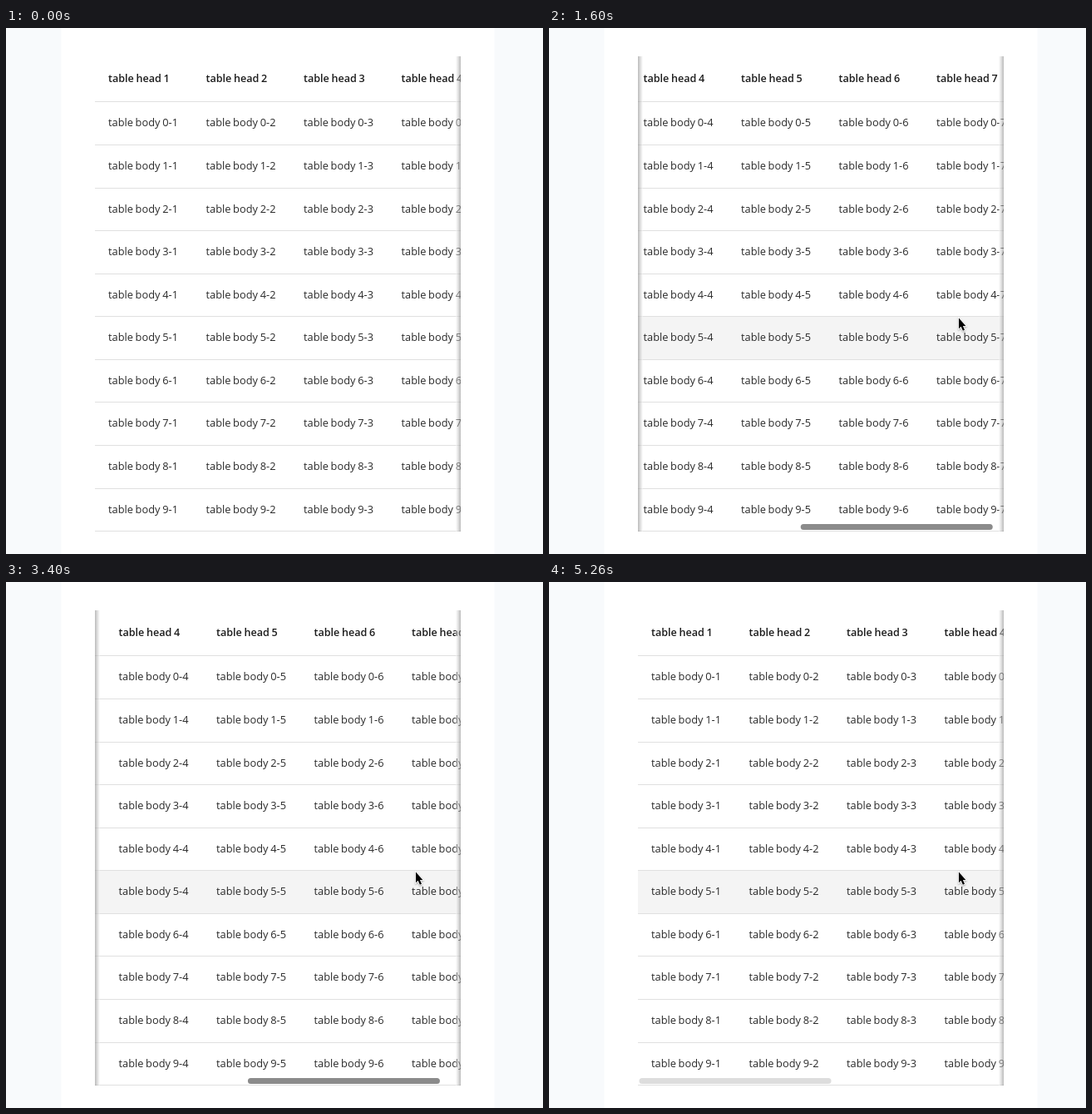
These frames come from a looping animation (646x632 px, 5410 ms). An HTML page with a canvas:

```html
<!DOCTYPE html>
<html lang="en">
<head>
<meta charset="utf-8">
<title>Scrolling table</title>
<style>
  html, body { margin: 0; width: 100%; height: 100%; overflow: hidden; background: #f8fafc; }
  canvas { display: block; }
</style>
</head>
<body>
<canvas id="stage" width="646" height="632"></canvas>
<script>
const ctx = document.getElementById('stage').getContext('2d');

const LOOP = 5410;
const VIEW = { left: 107, top: 34, right: 547, bottom: 605 };
const COLS = 7, ROWS = 10;
const COL_W = 117.5, ROW_H = 51.58;
const MAX_SCROLL = 383;
const HOVER_ROW = 5;
const FONT = '"Open Sans", "Noto Sans", sans-serif';

// [time in ms, horizontal scroll in px]
const SCROLL = [
  [1100, 0], [1200, 18], [1300, 93], [1400, 205], [1500, 305], [1600, 362], [1700, MAX_SCROLL],
  [2600, MAX_SCROLL], [2700, 381], [3000, 358], [3200, 346], [3400, 340], [3500, 344], [3800, MAX_SCROLL],
  [4100, MAX_SCROLL], [4200, 374], [4300, 342], [4400, 205], [4500, 65], [4600, 0]
];

// [start in ms, scrollbar opacity], held until the next entry
const BAR_ALPHA = [[0, 0], [1200, 1], [2200, 0.5], [2300, 0.1], [2700, 1], [5260, 0.29]];

function scrollAt(time) {
  const t = Math.floor(time / 100) * 100;
  if (t <= SCROLL[0][0]) return 0;
  for (let i = 1; i < SCROLL.length; i++) {
    const [t0, s0] = SCROLL[i - 1], [t1, s1] = SCROLL[i];
    if (t <= t1) return s0 + (s1 - s0) * (t - t0) / (t1 - t0);
  }
  return 0;
}

function held(steps, time) {
  let value = steps[0][1];
  for (const [start, v] of steps) if (time >= start) value = v;
  return value;
}

const lineY = i => Math.round(88.4 + ROW_H * i);

function rect(color, x, y, w, h) {
  ctx.fillStyle = color;
  ctx.fillRect(x, y, w, h);
}

function drawTable(scroll, hover) {
  const width = VIEW.right - VIEW.left;
  if (hover) {
    const y = lineY(HOVER_ROW);
    rect('#f4f4f4', VIEW.left, y, width, lineY(HOVER_ROW + 1) - y);
  }
  for (let i = 0; i <= ROWS; i++) rect('#e0e0e0', VIEW.left, lineY(i), width, 1);

  ctx.wordSpacing = '-0.6px';
  for (let c = 0; c < COLS; c++) {
    const x = VIEW.left + 16 + c * COL_W - scroll;
    if (x > VIEW.right || x + COL_W < VIEW.left) continue;
    ctx.fillStyle = '#1c1c1c';
    ctx.font = '600 12.6px ' + FONT;
    ctx.fillText('table head ' + (c + 1), x, 65);
    ctx.fillStyle = '#2a2a2a';
    ctx.font = '400 12.8px ' + FONT;
    for (let r = 0; r < ROWS; r++) {
      ctx.fillText('table body ' + r + '-' + (c + 1), x, lineY(r) + 30);
    }
  }
}

// Soft shade at a clipped side; dir points from the edge into the table.
function drawShade(edge, dir) {
  const size = 6, x = dir > 0 ? edge : edge - size;
  const height = VIEW.bottom - VIEW.top;
  const shade = ctx.createLinearGradient(edge, 0, edge + dir * size, 0);
  shade.addColorStop(0, 'rgba(0,0,0,0.27)');
  shade.addColorStop(0.5, 'rgba(0,0,0,0.12)');
  shade.addColorStop(1, 'rgba(0,0,0,0)');
  rect('rgba(255,255,255,0.45)', x, VIEW.top, size, height);
  rect(shade, x, VIEW.top, size, height);
}

function drawBar(scroll, alpha) {
  ctx.globalAlpha = alpha;
  ctx.fillStyle = '#8b8b8b';
  ctx.beginPath();
  ctx.roundRect(108.5 + 205.5 * scroll / MAX_SCROLL, 596, 231, 7, 3.5);
  ctx.fill();
  ctx.globalAlpha = 1;
}

function drawCursor() {
  const arrow = new Path2D('M493 348.6V361.3L495.7 358.8L497.9 363.7L500 362.8L497.9 358H501.4Z');
  ctx.save();
  ctx.shadowColor = 'rgba(0,0,0,0.35)';
  ctx.shadowBlur = 2;
  ctx.shadowOffsetY = 1;
  ctx.strokeStyle = '#fff';
  ctx.lineWidth = 1.6;
  ctx.stroke(arrow);
  ctx.restore();
  ctx.fillStyle = '#000';
  ctx.fill(arrow);
}

function draw(time) {
  const scroll = scrollAt(time);
  const pointer = time >= 100;
  rect('#f8fafc', 0, 0, 646, 632);
  rect('#fff', 66.5, 0, 521, 632);

  ctx.save();
  ctx.beginPath();
  ctx.rect(VIEW.left, VIEW.top, VIEW.right - VIEW.left, VIEW.bottom - VIEW.top);
  ctx.clip();
  drawTable(scroll, pointer);
  if (scroll > 0) drawShade(VIEW.left, 1);
  if (scroll < MAX_SCROLL) drawShade(VIEW.right, -1);
  drawBar(scroll, held(BAR_ALPHA, time));
  ctx.restore();

  if (pointer) drawCursor();
}

const start = performance.now();
function tick() {
  draw((performance.now() - start) % LOOP);
  requestAnimationFrame(tick);
}
tick();
</script>
</body>
</html>
```
